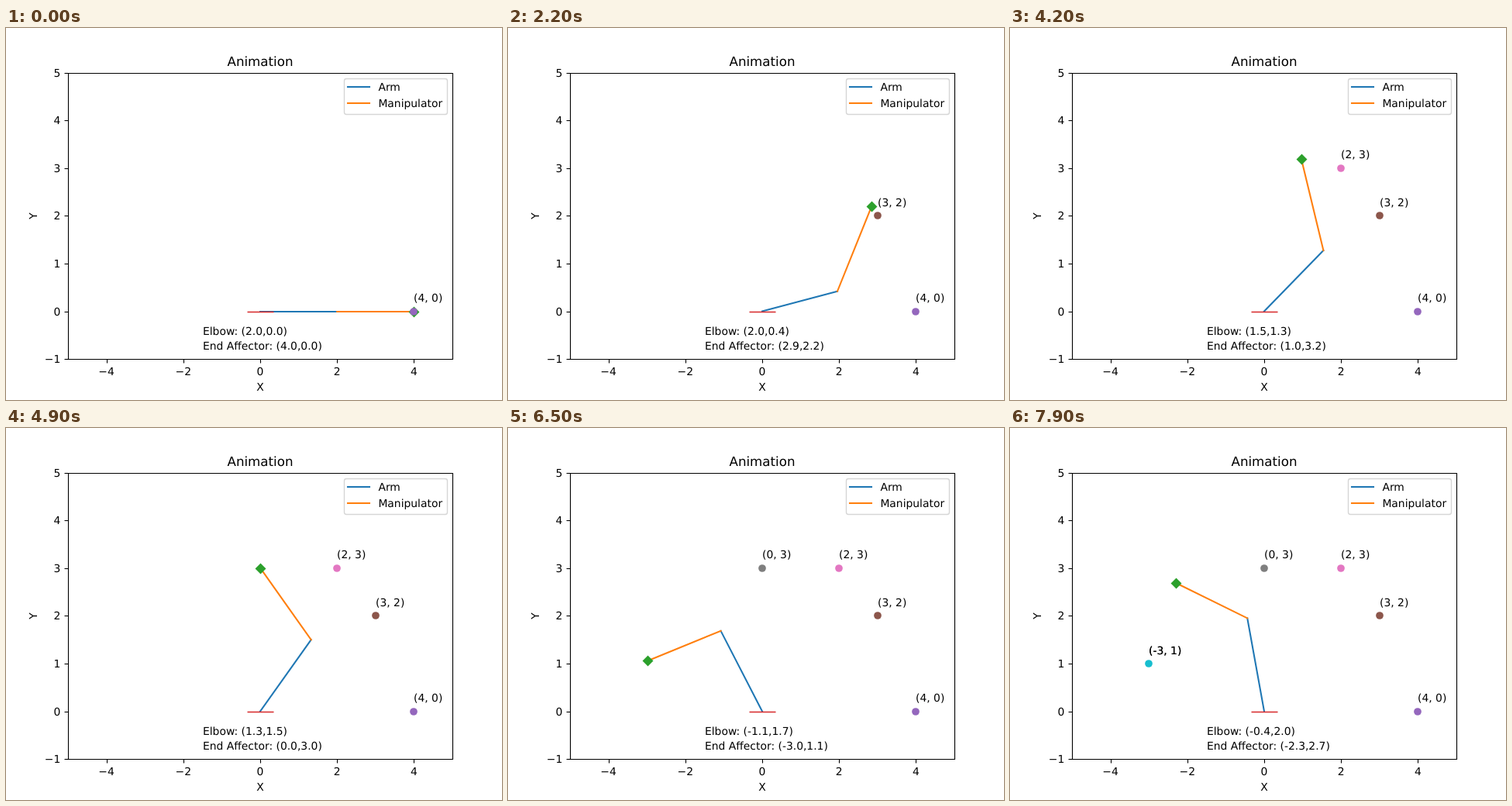
An HTML page for the animation above (8 s loop, 640 px wide and 480 px high).

```html
<!DOCTYPE html>
<html lang="en">
<head>
<meta charset="utf-8">
<title>Animation</title>
<style>
  html, body { margin: 0; width: 100%; height: 100%; overflow: hidden; background: #fff; }
  svg { display: block; width: 640px; height: 480px; }
  text { font: 13.889px "DejaVu Sans", sans-serif; text-rendering: geometricPrecision; white-space: pre; }
  .limb { stroke-width: 2.08; stroke-linecap: square; }
</style>
</head>
<body>
<svg id="plot" viewBox="0 0 640 480"></svg>
<script>
const plot = document.getElementById('plot');
const BLUE = '#1f77b4', ORANGE = '#ff7f0e', GREEN = '#2ca02c', RED = '#d62728';
const px = x => 328 + 49.6 * x;
const py = y => 365.6 - 61.6 * y;

function add(tag, attrs, content = '') {
  const el = document.createElementNS('http://www.w3.org/2000/svg', tag);
  for (const name in attrs) el.setAttribute(name, attrs[name]);
  el.textContent = content;
  return plot.appendChild(el);
}
const label = (x, y, content, anchor = 'start', extra = {}) =>
  add('text', { x, y, 'text-anchor': anchor, ...extra }, content);
const stroke = (d, color, width, extra = {}) =>
  add('path', { d, fill: 'none', stroke: color, 'stroke-width': width, ...extra });

// Moving parts, beneath the axes
const arm = stroke('', BLUE, 2.08, { class: 'limb' });
const manipulator = stroke('', ORANGE, 2.08, { class: 'limb' });
const tip = add('path', { d: 'M0-6 6 0 0 6-6 0Z', fill: GREEN, stroke: GREEN, 'stroke-width': 1.39 });
stroke('M311.5 366.5H345.5', RED, 1.39);

// Targets: position, colour, first step shown, number of overlaid labels
const targets = [
  [4, 0, '#9467bd', 0, 1],
  [3, 2, '#8c564b', 16, 1],
  [2, 3, '#e377c2', 33, 1],
  [0, 3, '#7f7f7f', 51, 1],
  [-3, 1, '#17becf', 67, 2],
].map(([x, y, fill, from, copies]) => {
  const parts = [add('circle', { cx: Math.round(px(x)), cy: Math.round(py(y)), r: 4.86, fill })];
  for (let i = 0; i < copies; i++)
    parts.push(label(Math.round(px(x)), Math.round(py(y + 0.2)), `(${x}, ${y})`));
  return { from, parts };
});

// Axes
stroke('M80.5 58.5H576.5V427.5H80.5Z', '#000', 1.11);
for (let x = -4; x <= 4; x += 2) {
  stroke(`M${Math.round(px(x)) + 0.5} 427.5v5`, '#000', 1.11);
  label(px(x), 448, String(x).replace('-', '−'), 'middle');
}
for (let y = -1; y <= 5; y++) {
  const row = Math.round(py(y));
  stroke(`M80.5 ${row + 0.5}h-5`, '#000', 1.11);
  label(70.3, row + 5, String(y).replace('-', '−'), 'end');
}
label(328, 49, 'Animation', 'middle', { style: 'font-size:16.667px' });
label(328, 468, 'X', 'middle');
label(0, 0, 'Y', 'middle', { transform: 'translate(40 242.4) rotate(-90)' });

// Legend
add('rect', { x: 436.5, y: 65.5, width: 133, height: 46, rx: 2.78,
  fill: '#fff', 'fill-opacity': 0.8, stroke: '#ccc', 'stroke-opacity': 0.8, 'stroke-width': 1.39 });
[['Arm', BLUE, 76], ['Manipulator', ORANGE, 97]].forEach(([name, color, y]) => {
  stroke(`M441 ${y}H469`, color, 2.08, { class: 'limb' });
  label(480.4, y + 5, name);
});

const elbowText = label(254, 396, '');
const tipText = label(254, 415, '');

// Joint angles that put the tip of two links of length 2 at (x, y)
function solve([x, y]) {
  const bend = Math.acos((x * x + y * y - 8) / 8);
  return [Math.atan2(y, x) - bend / 2, bend];
}
const poses = [[4, 0], [3, 2], [2, 3], [0, 3], [-3, 1], [-2, 3]].map(solve);
const ease = s => s ** 3 * (10 - 15 * s + 6 * s * s);

const STEP = 100, STEPS = 80, PER_MOVE = 17;
const format = (x, y) => `(${x.toFixed(1)},${y.toFixed(1)})`;

function limbPath(x0, y0, x1, y1) {
  const flat = y0 === y1;
  const row = y => flat ? Math.round(py(y)) : py(y);
  return `M${px(x0)} ${row(y0)}L${px(x1)} ${row(y1)}`;
}

function draw() {
  const step = Math.floor(performance.now() / STEP) % STEPS;
  const move = Math.floor(step / PER_MOVE);
  const k = ease(step % PER_MOVE / (PER_MOVE - 1));
  const [shoulder, bend] = poses[move].map((a, i) => a + (poses[move + 1][i] - a) * k);
  const ex = 2 * Math.cos(shoulder), ey = 2 * Math.sin(shoulder);
  const tx = ex + 2 * Math.cos(shoulder + bend), ty = ey + 2 * Math.sin(shoulder + bend);

  arm.setAttribute('d', limbPath(0, 0, ex, ey));
  manipulator.setAttribute('d', limbPath(ex, ey, tx, ty));
  tip.setAttribute('transform', `translate(${Math.round(px(tx)) + 0.5} ${Math.round(py(ty)) + 0.5})`);
  elbowText.textContent = 'Elbow: ' + format(ex, ey);
  tipText.textContent = 'End Affector: ' + format(tx, ty);
  for (const { from, parts } of targets)
    for (const part of parts) part.style.display = step >= from ? '' : 'none';
  requestAnimationFrame(draw);
}
draw();
</script>
</body>
</html>
```
